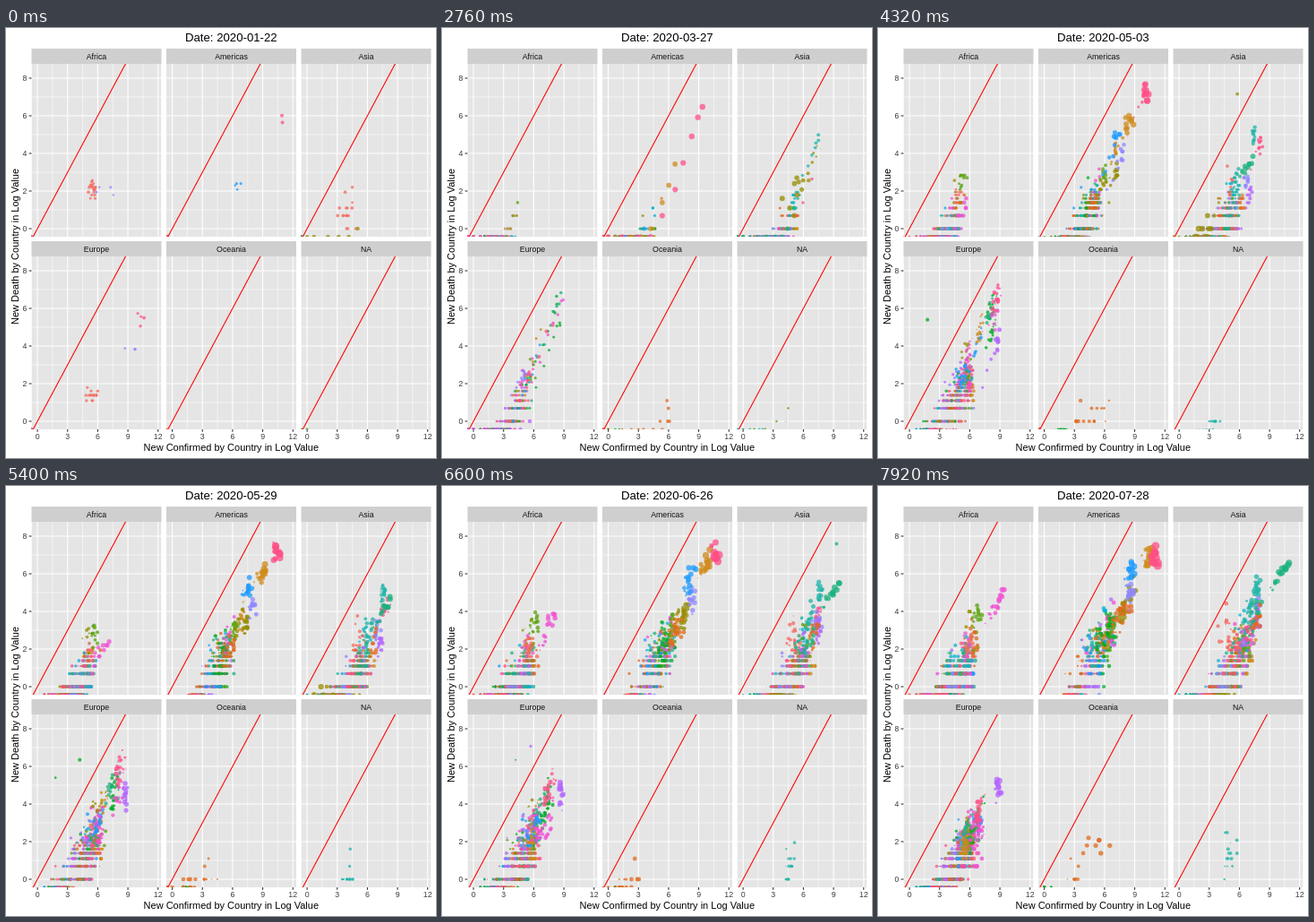
Write an HTML page with a canvas that moves like this. It is 480 px wide and 480 px high and loops after 8 s.

```html
<!DOCTYPE html>
<html lang="en">
<head>
<meta charset="utf-8">
<title>New cases and deaths by continent</title>
<style>
html, body { margin: 0; width: 100%; height: 100%; overflow: hidden; background: #fff; }
canvas { display: block; width: 100vw; height: 100vh; }
</style>
</head>
<body>
<canvas id="stage" width="480" height="480"></canvas>
<script>
const ctx = document.getElementById('stage').getContext('2d');
const FONT = '"Liberation Sans", Arial, sans-serif';
const STEP = 120, LOOP = 8000, LAST = 66, DAYS = 188;
const WAKE = 16, RISE = 13;
const PANELS = ['Africa', 'Americas', 'Asia', 'Europe', 'Oceania', 'NA'];
const [AFR, AME, ASI, EUR, OCE, NONE] = PANELS.keys();
const PANEL_W = 145, PANEL_H = 193, UNIT_X = 11.22, UNIT_Y = 21;

const HUES = {
  salmon: '#f4685f', orange: '#e0691f', amber: '#cf8a1a', olive: '#968c00',
  lime: '#5aa30c', green: '#00ab26', jade: '#1ab27f', teal: '#1fb5a8',
  cyan: '#0aafd2', blue: '#1d9bff', peri: '#8f87ff', purple: '#b565ff',
  magenta: '#f04fd4', pink: '#ff4f87'
};
const HUE_NAMES = Object.keys(HUES);

const panelX = p => 28.5 + (p % 3) * 150.5;
const panelY = p => (p > 2 ? 255 : 40);
const toX = (p, v) => panelX(p) + 6.6 + v * UNIT_X;
const toY = (p, v) => panelY(p) + 184 - v * UNIT_Y;
const clamp = v => Math.max(0, Math.min(1, v));
const mix = (a, b, u) => a + (b - a) * u;

let seed = 20;
function rnd() {
  seed = (seed + 0x6d2b79f5) | 0;
  let h = Math.imul(seed ^ (seed >>> 15), seed | 1);
  h ^= h + Math.imul(h ^ (h >>> 7), h | 61);
  return ((h ^ (h >>> 14)) >>> 0) / 4294967296;
}
const gauss = () => 2 * (rnd() + rnd() + rnd() - 1.5);

const dots = PANELS.map(() => []);

// Counts are whole numbers; zero has no logarithm and sits on the panel edge.
function addDot(panel, hue, r, k, x, y) {
  const cases = Math.round(Math.exp(x)), deaths = Math.round(Math.exp(y));
  dots[panel].push({
    k, r, color: HUES[hue],
    x: cases ? toX(panel, Math.log(cases)) : panelX(panel),
    y: deaths ? toY(panel, Math.log(deaths)) : panelY(panel) + PANEL_H
  });
}

// Cases climb to `mid` during RISE steps, then drift to `end`; deaths trail by `gap`.
function outbreak(panel, hue, r, start, [mid, end], [gap, endGap], last = LAST, noise = 0.3) {
  for (let k = Math.min(0, start); k <= last; k++) {
    const p = 1 - (1 - clamp((k - start) / RISE)) ** 2;
    const u = clamp((k - start - RISE) / (last - start - RISE));
    const x = mix(-2, mix(mid, end, u), p);
    const y = x - mix(gap, endGap, u) - 5 * (1 - p);
    const n = noise * clamp(k / 40);
    addDot(panel, hue, r * mix(0.55, 1, k / LAST), k, x + gauss() * n / 2, y + gauss() * n);
  }
}

// Many small countries that follow the level of their panel.
function crowd(panel, count, start, [mid, end], [gap, endGap]) {
  for (let i = 0; i < count; i++) {
    const share = rnd() ** 0.6, shift = (rnd() - 0.5) * 1.5;
    const hue = HUE_NAMES[Math.floor(rnd() * HUE_NAMES.length)];
    outbreak(panel, hue, 1.5 + share * 0.9, Math.round(start + rnd() * 8),
      [mid * share, end * share], [gap + shift, endGap + shift], LAST, 0.65);
  }
}

// A burst of dots around one place at one step.
function burst(panel, hue, r, k, x, y, spread = 0, count = 1) {
  for (let i = 0; i < count; i++) {
    addDot(panel, hue, r * mix(1, 0.7, rnd()), k, x + gauss() * spread, y + gauss() * spread);
  }
}

crowd(AFR, 50, 13, [4.8, 6.6], [4.2, 4.2]);
outbreak(AFR, 'salmon', 2.2, 14, [4.6, 6.2], [2.8, 4]);
outbreak(AFR, 'lime', 2.5, 14, [5, 7], [2.7, 2.9]);
outbreak(AFR, 'magenta', 3, 17, [5, 9.5], [4.2, 4.1]);
burst(AFR, 'salmon', 2.4, -8, 5.5, 2.1, 0.25, 18);
burst(AFR, 'peri', 1.6, -3, 6.2, 2.6, 0.7, 4);

crowd(AME, 26, 11, [5.2, 7], [3.6, 3.5]);
outbreak(AME, 'lime', 2.7, 16, [6, 6.6], [3, 3.3]);
outbreak(AME, 'amber', 2.4, 16, [7.2, 6.1], [2.8, 4]);
outbreak(AME, 'green', 2.7, 22, [4.2, 7], [3.6, 3.5]);
outbreak(AME, 'olive', 3, 17, [7.2, 7.8], [4.4, 3.5]);
outbreak(AME, 'olive', 2.7, 18, [5.6, 9], [3.6, 3.4]);
outbreak(AME, 'orange', 2.7, 17, [4.5, 8.6], [3.6, 4.1]);
outbreak(AME, 'orange', 2.6, 20, [5, 7.8], [3.8, 3.4]);
outbreak(AME, 'peri', 3, 18, [7.7, 8.7], [3.8, 3.5]);
outbreak(AME, 'blue', 3.4, 18, [7, 9], [2.3, 2.5]);
outbreak(AME, 'amber', 4, 15, [8.2, 10.9], [2.7, 3.8]);
outbreak(AME, 'pink', 4.6, 13, [10, 11.1], [2.7, 4.4]);
burst(AME, 'pink', 2.4, -3, 11.2, 6.4, 0.4, 2);
burst(AME, 'blue', 1.8, -3, 6.5, 2.3, 0.3, 4);

crowd(ASI, 38, 4, [5.2, 7.1], [4.3, 4.3]);
outbreak(ASI, 'olive', 4.2, -6, [7.9, 1], [3.2, 3.5], 38, 0.9);
outbreak(ASI, 'olive', 2, 30, [2.5, 4.8], [7, 7]);
outbreak(ASI, 'teal', 2.8, 9, [7.4, 7.8], [2.6, 2.6]);
outbreak(ASI, 'pink', 2.5, 15, [8.2, 6.8], [3.5, 4]);
outbreak(ASI, 'teal', 2.7, 17, [5.5, 7.5], [3, 3.1]);
outbreak(ASI, 'peri', 2.8, 17, [6.6, 8], [4, 3.8]);
outbreak(ASI, 'purple', 2.7, 17, [7, 7.9], [5.2, 4.1]);
outbreak(ASI, 'orange', 2.7, 20, [6.2, 8.1], [4.6, 4.3]);
outbreak(ASI, 'salmon', 2.4, 20, [5.2, 4.8], [3.2, 2.3], LAST, 1);
outbreak(ASI, 'jade', 2.6, 20, [4.8, 8], [4.5, 3.5]);
outbreak(ASI, 'jade', 3.6, 15, [6.3, 10.9], [3.3, 4.3], LAST, 0.15);
burst(ASI, 'salmon', 2.2, -8, 4.2, 0.9, 0.6, 16);
burst(ASI, 'olive', 2, 30, 5.8, 7.16);
burst(ASI, 'jade', 2.3, 51, 9.3, 7.6);

crowd(EUR, 40, 7, [6, 6.2], [3.1, 4]);
outbreak(EUR, 'green', 2.5, 10, [8.4, 6.7], [1.9, 3.9], LAST, 0.4);
outbreak(EUR, 'jade', 2.5, 10, [8.6, 5.3], [2, 3.2]);
outbreak(EUR, 'green', 2.3, 10, [8.6, 6], [3.4, 4]);
outbreak(EUR, 'magenta', 2.5, 11, [9, 6.6], [2.3, 5.8]);
outbreak(EUR, 'blue', 2.2, 13, [7.1, 4.8], [2.4, 4]);
outbreak(EUR, 'amber', 2.2, 13, [7.2, 5.2], [1.8, 4]);
outbreak(EUR, 'magenta', 2.3, 14, [6, 6.2], [2, 4], LAST, 0.5);
outbreak(EUR, 'blue', 2.4, 16, [5.4, 7], [2.8, 3.9]);
outbreak(EUR, 'amber', 2.4, 18, [6.4, 5.4], [5, 3.8]);
outbreak(EUR, 'magenta', 2.4, 20, [6, 7], [4, 4.1]);
outbreak(EUR, 'pink', 3, 14, [8.8, 6.5], [1.9, 3.4]);
outbreak(EUR, 'purple', 3.2, 17, [8.8, 8.75], [4.6, 3.8]);
burst(EUR, 'salmon', 2.2, -8, 5.4, 1.4, 0.3, 14);
burst(EUR, 'pink', 2, -3, 10.1, 5.3, 0.3, 4);
burst(EUR, 'peri', 1.8, -3, 9.2, 3.7, 0.2, 3);
burst(EUR, 'green', 2.6, 34, 1.8, 5.4);
burst(EUR, 'green', 2.4, 42, 4.2, 6.35);
burst(EUR, 'purple', 2, 51, 5.7, 7.07);

outbreak(OCE, 'green', 1.8, 16, [2, 0], [5, 5]);
outbreak(OCE, 'orange', 2.8, 10, [6.2, 1], [5.3, 2.5], 46, 0.7);
outbreak(OCE, 'orange', 2.7, 42, [2.9, 6.2], [3, 4], LAST, 0.6);

outbreak(NONE, 'lime', 3, -2, [4.5, 1], [4, 3], 14);
outbreak(NONE, 'teal', 2, 17, [3.4, 5.4], [3.6, 3.7], LAST, 0.5);

function line(x0, y0, x1, y1, color, width) {
  ctx.strokeStyle = color;
  ctx.lineWidth = width;
  ctx.beginPath();
  ctx.moveTo(x0, y0);
  ctx.lineTo(x1, y1);
  ctx.stroke();
}

function text(str, x, y, size, color, align = 'center') {
  ctx.font = `${size}px ${FONT}`;
  ctx.fillStyle = color;
  ctx.textAlign = align;
  ctx.fillText(str, x, y);
}

function drawGrid(p, x, y) {
  for (const [offset, width] of [[0.5, 0.55], [0, 1.07]]) {
    for (let v = offset * 3; v <= 12; v += 3) {
      line(toX(p, v), y, toX(p, v), y + PANEL_H, '#fff', width);
    }
    for (let v = offset * 2; v < 9; v += 2) {
      line(x, toY(p, v), x + PANEL_W, toY(p, v), '#fff', width);
    }
  }
}

// Older dots shrink, slowly at first.
function drawDots(p, n) {
  ctx.globalAlpha = 0.75;
  for (const d of dots[p]) {
    const age = n - d.k;
    if (age < 0 || age >= WAKE) continue;
    ctx.fillStyle = d.color;
    ctx.beginPath();
    ctx.arc(d.x, d.y, d.r * (1 - (age / WAKE) ** 3), 0, 7);
    ctx.fill();
  }
  ctx.globalAlpha = 1;
}

function drawPanel(p, n) {
  const x = panelX(p), y = panelY(p), bottom = y + PANEL_H;
  ctx.fillStyle = '#cfcfcf';
  ctx.fillRect(x, y - 17, PANEL_W, 17);
  text(PANELS[p], x + PANEL_W / 2, y - 5, 8.8, '#111');

  ctx.save();
  ctx.beginPath();
  ctx.rect(x, y, PANEL_W, PANEL_H);
  ctx.clip();
  ctx.fillStyle = '#e5e5e5';
  ctx.fillRect(x, y, PANEL_W, PANEL_H);
  drawGrid(p, x, y);
  drawDots(p, n);
  line(toX(p, -1), toY(p, -1), toX(p, 10), toY(p, 10), '#f00', 1.07);
  ctx.restore();

  if (p % 3 === 0) {
    for (let v = 0; v < 9; v += 2) {
      line(x - 2.8, toY(p, v), x, toY(p, v), '#222', 1);
      text(v, x - 5, toY(p, v) + 3.2, 8.8, '#3c3c3c', 'right');
    }
  }
  if (p > 2) {
    for (let v = 0; v <= 12; v += 3) {
      line(toX(p, v), bottom, toX(p, v), bottom + 2.8, '#222', 1);
      text(v, toX(p, v), bottom + 11, 8.8, '#3c3c3c');
    }
  }
}

function draw(n) {
  ctx.fillStyle = '#fff';
  ctx.fillRect(0, 0, 480, 480);
  const day = Math.floor(n * DAYS / LAST);
  const date = new Date(Date.UTC(2020, 0, 22 + day)).toISOString().slice(0, 10);
  text('Date: ' + date, 251.3, 15, 13.2, '#000');
  PANELS.forEach((_, p) => drawPanel(p, n));
  text('New Confirmed by Country in Log Value', 251.3, 472, 11, '#000');
  ctx.save();
  ctx.translate(13.5, 244);
  ctx.rotate(-Math.PI / 2);
  text('New Death by Country in Log Value', 0, 0, 11, '#000');
  ctx.restore();
}

let shown = -1;
function tick() {
  const n = Math.min(LAST, Math.floor(performance.now() % LOOP / STEP));
  if (n !== shown) draw(shown = n);
  requestAnimationFrame(tick);
}
tick();
</script>
</body>
</html>
```
